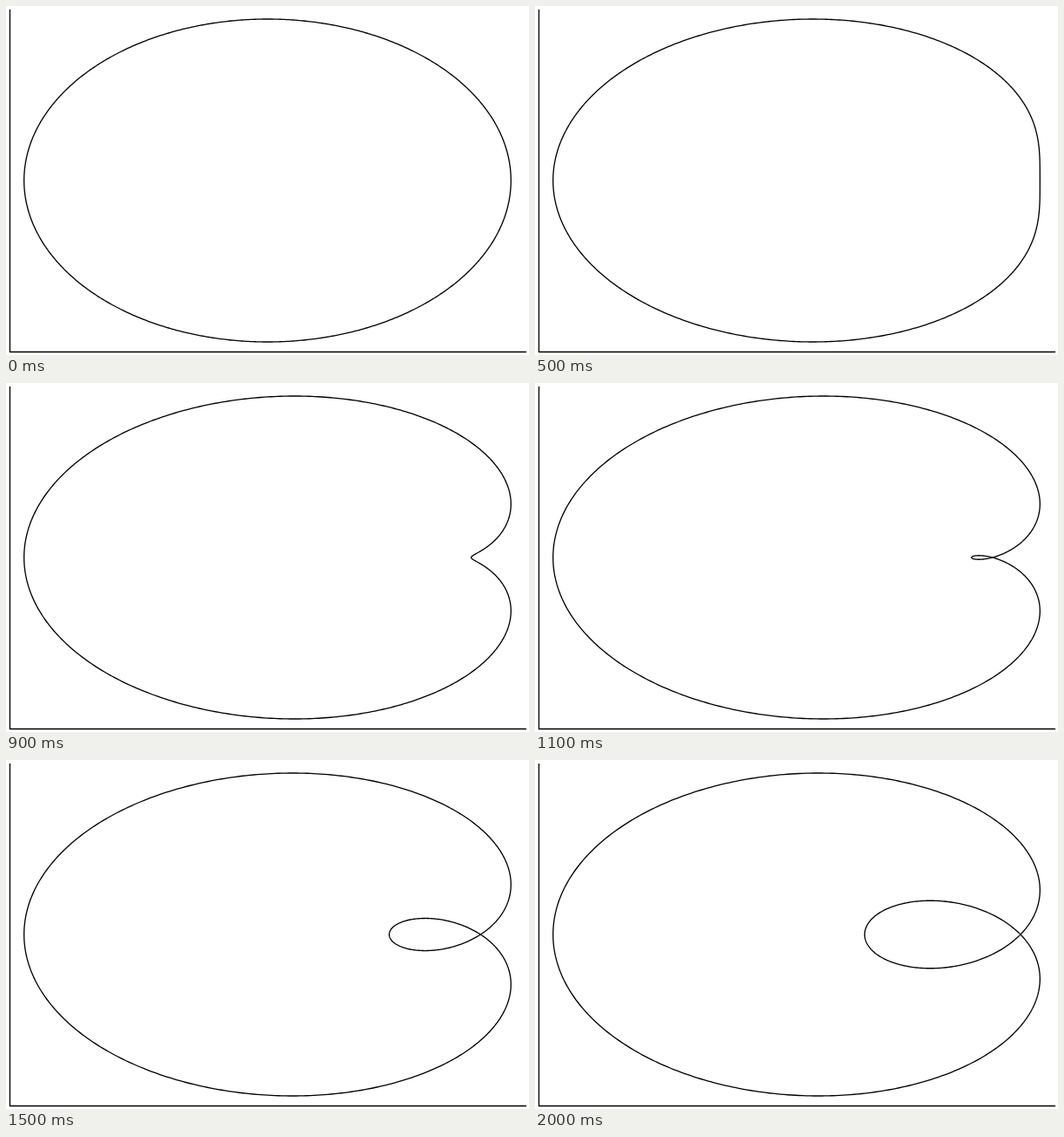
An HTML page for the animation above (2.1 s loop, 600 by 400 pixels).

```html
<!DOCTYPE html>
<html lang="en">
<head>
<meta charset="utf-8">
<title>Limaçon</title>
<style>
  html, body { margin: 0; width: 100%; height: 100%; overflow: hidden; background: #fff; }
  svg { display: block; }
  path { fill: none; stroke: #000; stroke-width: 1.33; }
</style>
</head>
<body>
<svg width="600" height="400" viewBox="0 0 600 400">
  <path d="M4.5 4V396.5H597"/>
  <path id="curve"/>
</svg>
<script>
  const STEP_MS = 100, STEPS = 21, SAMPLES = 720;
  const box = { left: 20.7, right: 579.3, top: 15, bottom: 385 };
  const curve = document.getElementById('curve');

  // Linear map from the extent of the values to [from, to].
  function fit(values, from, to) {
    const min = Math.min(...values), max = Math.max(...values);
    return v => from + (v - min) / (max - min) * (to - from);
  }

  // r = 1 - a cos(theta), scaled to fill the box.
  function limacon(a) {
    const xs = [], ys = [];
    for (let i = 0; i < SAMPLES; i++) {
      const theta = 2 * Math.PI * i / SAMPLES;
      const r = 1 - a * Math.cos(theta);
      xs.push(r * Math.cos(theta));
      ys.push(r * Math.sin(theta));
    }
    const sx = fit(xs, box.left, box.right), sy = fit(ys, box.bottom, box.top);
    return 'M' + xs.map((x, i) => sx(x).toFixed(2) + ' ' + sy(ys[i]).toFixed(2)).join('L') + 'Z';
  }

  let start = null, shown = -1;
  function draw(now) {
    if (start === null) start = now;
    const step = Math.floor((now - start) / STEP_MS) % STEPS;
    if (step !== shown) {
      shown = step;
      curve.setAttribute('d', limacon(step / 10));
    }
    requestAnimationFrame(draw);
  }
  curve.setAttribute('d', limacon(0));
  requestAnimationFrame(draw);
</script>
</body>
</html>
```
